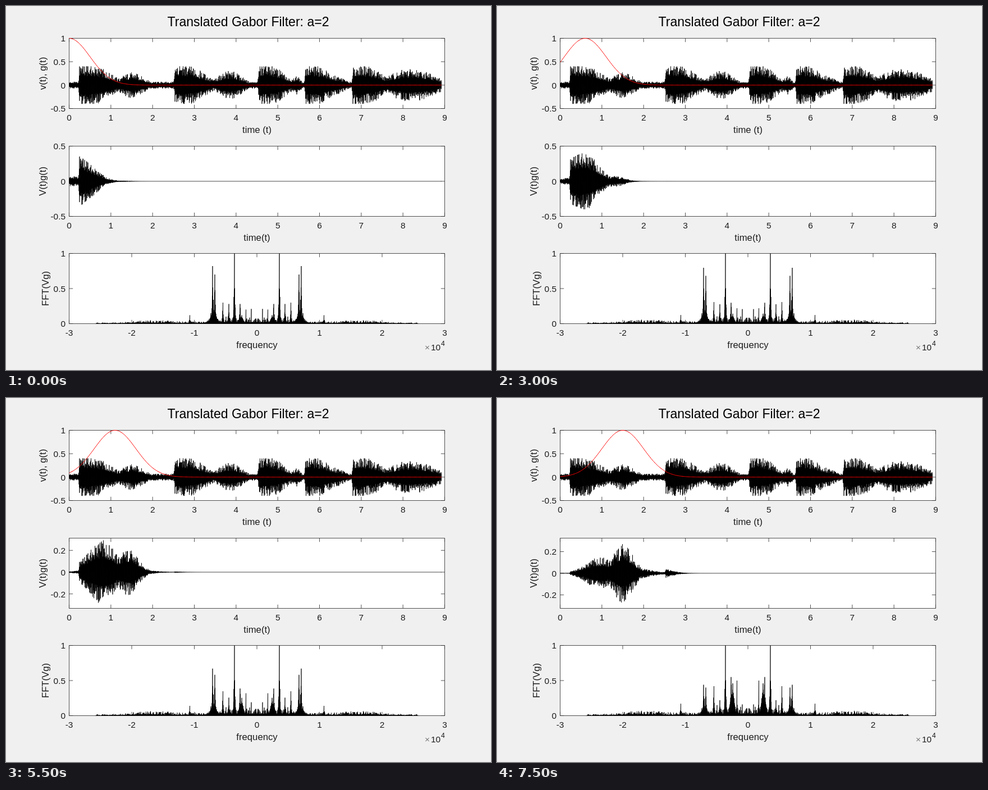
These frames come from a looping animation (864 by 648 pixels, 8000 ms). An HTML page:

```html
<!DOCTYPE html>
<html lang="en">
<head>
<meta charset="utf-8">
<title>Translated Gabor Filter</title>
<style>
  html, body { margin: 0; width: 100%; height: 100%; overflow: hidden; background: #f0f0f0; }
  svg { display: block; width: 864px; height: 648px; }
  text { font-family: "Liberation Sans", Arial, sans-serif; font-size: 15.4px; fill: #1c1c1c; }
  .label { font-size: 16.7px; text-anchor: middle; }
  .title { font-size: 23.05px; text-anchor: middle; fill: #000; }
  .end { text-anchor: end; }
  .mid { text-anchor: middle; }
  path { fill: none; stroke-linejoin: bevel; }
  .axis { stroke: #262626; stroke-width: .8; }
  .data { stroke: #000; stroke-width: .8; }
  .window { stroke: #f00; stroke-width: 1; }
</style>
</head>
<body>
<svg id="stage" viewBox="0 0 864 648"></svg>
<script>
const stage = document.getElementById('stage');
const LEFT = 112.5, RIGHT = 781.5, WIDTH = RIGHT - LEFT, HEIGHT = 125, CENTER = (LEFT + RIGHT) / 2;
const TOPS = [57.5, 249.5, 440.5];
const PER_SEC = WIDTH / 9, DURATION = 8.925, BAND = 287;
const STEP_MS = 500, STEPS = 16;

// Sung notes: onset and length, then time, height and width of the swell that follows
const NOTES = [
  [.25, .9, 1.5, .26, .4],
  [2.54, .85, 3.85, .29, .4],
  [4.55, .75, 5.45, .19, .13],
  [5.67, .75, 6.35, .2, .35],
  [6.8, .85, 8.2, .34, .75]
];

// Spectral peaks: offset, width, first height, last height
const PEAKS = [
  [40, .9, 1, 1], [79, .9, .82, .44], [75, .9, .7, .4], [77.5, 4, .34, .24],
  [60.5, .9, .3, .42], [55, 1, .1, .15], [50, 1.2, .28, .22], [30, 1, .28, .55],
  [27, 4, .12, .46], [19.5, .4, .2, .5], [10, .3, .21, .16], [119.5, 1.3, .12, .17]
];

const rand = (i, salt) => {
  const s = Math.sin(i * 12.9898 + salt * 78.233) * 43758.5453;
  return s - Math.floor(s);
};
const clamp = (v, lo, hi) => Math.max(lo, Math.min(hi, v));
const bell = (x, at, width) => Math.exp(-(((x - at) / width) ** 2));
const gabor = (t, tau) => Math.exp(-2 * (t - tau) ** 2);
const xOf = t => LEFT + t * PER_SEC;
const yOf = (v, top, lo, hi) => top + (hi - v) / (hi - lo) * HEIGHT;

function add(tag, attrs, text = '', parent = stage) {
  const el = document.createElementNS('http://www.w3.org/2000/svg', tag);
  for (const key in attrs) el.setAttribute(key, attrs[key]);
  el.textContent = text;
  parent.append(el);
  return el;
}
const write = (text, x, y, cls, parent) => add('text', { x, y, class: cls }, text, parent);
const path = cls => add('path', { class: cls });

// Each note has a sharp attack, a body that falls off and a softer swell
function envelope(t) {
  let level = .07;
  for (const [onset, length, at, height, width] of NOTES) {
    const age = t - onset;
    const body = age < 0 ? .42 * Math.exp(age / .02) : .42 * Math.exp(-((age / length) ** 3));
    level = Math.max(level, body, height * bell(t, at, width));
  }
  return level;
}

// Low and high value of the sound for every half pixel
const sound = [];
for (let i = 0; i <= DURATION * PER_SEC * 2; i++) {
  const t = i / 2 / PER_SEC, env = envelope(t);
  const level = salt => Math.min(.4, env * (.45 + .6 * rand(i, salt) ** 2));
  sound.push({ t, hi: level(1), lo: -level(2) });
}

function soundPath(top, lo, hi, gain) {
  const y = v => yOf(clamp(v, lo, hi), top, lo, hi).toFixed(2);
  return 'M' + sound.map(s => {
    const g = gain(s.t);
    return `${xOf(s.t).toFixed(2)} ${y(s.hi * g)}V${y(s.lo * g)}`;
  }).join('L');
}

function windowPath(tau) {
  const pts = [];
  for (let t = 0; t <= DURATION; t += .015)
    pts.push(`${xOf(t).toFixed(2)} ${yOf(gabor(t, tau), TOPS[0], -.5, 1).toFixed(2)}`);
  return 'M' + pts.join('L');
}

// Mirrored spectrum: a noise floor with peaks that shift as the window moves on
function spectrumPath(tau) {
  const k = (tau / 1.5) ** 3, base = TOPS[2] + HEIGHT;
  const left = [], right = [];
  for (let i = 0; i <= BAND * 2; i++) {
    const d = i / 2, r = rand(i, 3);
    const floor = .015 + .075 * bell(d, 0, 80) + .035 * bell(d, 185, 50);
    let h = floor * (1 + .3 * tau) * (.2 + .8 * r ** 3);
    for (const [at, width, first, last] of PEAKS) {
      const gap = Math.abs(d - at) / width, top = first + (last - first) * k;
      h = Math.max(h, top / (1 + gap ** 2) * (gap ? .35 + .65 * r : 1));
    }
    const y = (base - h * HEIGHT).toFixed(2);
    left.unshift(`${CENTER - d} ${y}V${base}`);
    right.push(`${CENTER + d} ${y}V${base}`);
  }
  return 'M' + left.concat(right).join('L');
}

// Box with inward ticks on all four sides
function boxPath(top, xs, ys) {
  const bottom = top + HEIGHT, tick = 6.7;
  return `M${LEFT} ${top}H${RIGHT}V${bottom}H${LEFT}Z`
    + xs.map(x => `M${x} ${bottom}v${-tick}M${x} ${top}v${tick}`).join('')
    + ys.map(y => `M${LEFT} ${y}h${tick}M${RIGHT} ${y}h${-tick}`).join('');
}

function yTicks(top, lo, hi, values, parent) {
  return values.map(v => {
    const y = yOf(v, top, lo, hi);
    write(v, 106, y + 5.8, 'end', parent);
    return y;
  });
}

TOPS.forEach(y => add('rect', { x: LEFT, y, width: WIDTH, height: HEIGHT, fill: '#fff' }));
const axes = TOPS.map(() => path('axis'));
const signal = path('data'), filtered = path('data'), spectrum = path('data'), win = path('window');
const middleLabels = add('g', {});

const seconds = [...Array(10).keys()], freqs = [-3, -2, -1, 0, 1, 2, 3];
const secondXs = seconds.map(xOf), freqXs = freqs.map(f => CENTER + f * WIDTH / 6);

write('Translated Gabor Filter: a=2', 431.5, 36, 'title');
[['time (t)', 'v(t), g(t)', 71], ['time(t)', 'V(t)g(t)', 70.5], ['frequency', 'FFT(Vg)', 76]]
  .forEach(([xName, yName, x], i) => {
    const bottom = TOPS[i] + HEIGHT;
    write(xName, CENTER, bottom + 43, 'label');
    add('text', { class: 'label', transform: `translate(${x} ${bottom - HEIGHT / 2}) rotate(-90)` }, yName);
    const values = i < 2 ? seconds : freqs, xs = i < 2 ? secondXs : freqXs;
    values.forEach((v, k) => write(v, xs[k], bottom + 21.6, 'mid'));
  });
add('text', { x: 746, y: 613, style: 'fill:#777' }, '×');
write('10', 774, 613, 'end');
add('text', { x: 775, y: 605, style: 'font-size:12.3px' }, '4');

axes[0].setAttribute('d', boxPath(TOPS[0], secondXs, yTicks(TOPS[0], -.5, 1, [-.5, 0, .5, 1])));
axes[2].setAttribute('d', boxPath(TOPS[2], freqXs, yTicks(TOPS[2], 0, 1, [0, .5, 1])));
signal.setAttribute('d', soundPath(TOPS[0], -.5, 1, () => 1));

// From tau = 1 on, the middle plot hugs its data
function middleLimits(tau) {
  if (tau < 1) return [-.5, .5, .5];
  return [-.343 + .35 * (tau - 1.27) ** 2, .288 + .75 * (tau - 1.28) ** 2, .2];
}

function draw(step) {
  const tau = step / 10;
  const [lo, hi, mark] = middleLimits(tau);
  middleLabels.replaceChildren();
  axes[1].setAttribute('d', boxPath(TOPS[1], secondXs, yTicks(TOPS[1], lo, hi, [-mark, 0, mark], middleLabels)));
  win.setAttribute('d', windowPath(tau));
  filtered.setAttribute('d', soundPath(TOPS[1], lo, hi, t => gabor(t, tau)));
  spectrum.setAttribute('d', spectrumPath(tau));
}

let shown = -1;
function tick() {
  const step = Math.floor(performance.now() / STEP_MS) % STEPS;
  if (step !== shown) draw(shown = step);
  requestAnimationFrame(tick);
}
tick();
</script>
</body>
</html>
```
